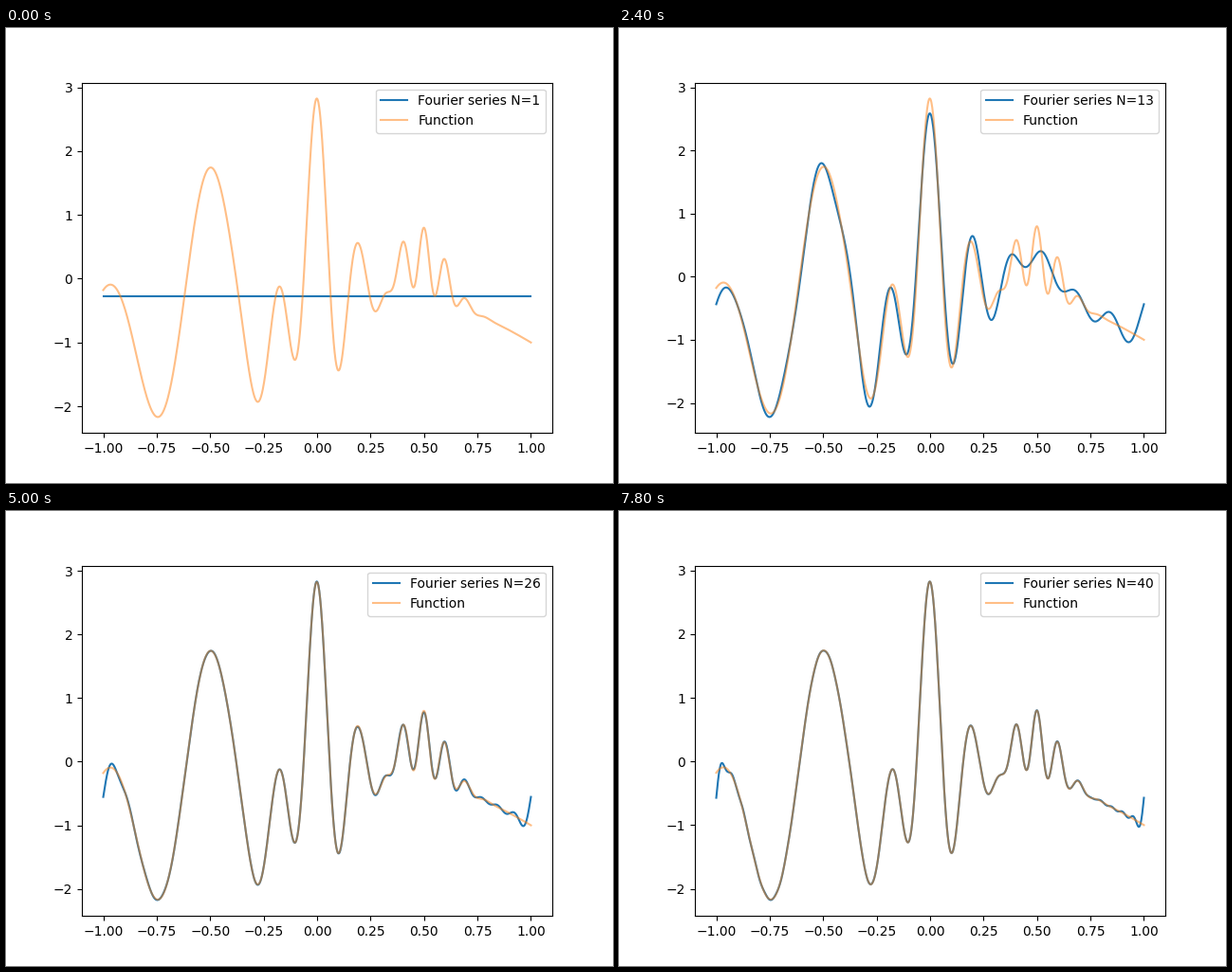
Write a matplotlib script that moves like this. It is 640x480 px and loops after 8000 ms.

```python
import numpy as np
import matplotlib.pyplot as plt
from matplotlib.animation import FuncAnimation

TERMS = 40
x = np.linspace(-1, 1, 1001)


def packet(t, freq):
    """Cosine under a Gaussian three quarters of a period wide."""
    sigma = 0.75 / freq
    return np.cos(2 * np.pi * freq * t) * np.exp(-t**2 / (2 * sigma**2))


y = 2 * packet(x + 0.5, 2) + 2 * packet(x, 5) + packet(x - 0.5, 5)**2 - x**2

# Trapezoid weights over one period of length 2
weights = np.full(x.size, x[1] - x[0])
weights[[0, -1]] /= 2


def harmonic(n):
    wave = np.exp(1j * np.pi * n * x)
    coef = np.sum(weights * y * wave.conj()) / (2 if n == 0 else 1)
    return (coef * wave).real


partial_sums = np.cumsum([harmonic(n) for n in range(TERMS)], axis=0)

fig, ax = plt.subplots(figsize=(6.4, 4.8), dpi=100)
series, = ax.plot(x, partial_sums[0], label="Fourier series N=1")
ax.plot(x, y, alpha=0.5, label="Function")


def update(i):
    series.set_ydata(partial_sums[i])
    series.set_label(f"Fourier series N={i + 1}")
    ax.relim()
    ax.autoscale_view()
    ax.legend(loc="upper right")


anim = FuncAnimation(fig, update, frames=TERMS, interval=200,
                     repeat=True, repeat_delay=0)
plt.show()
```
